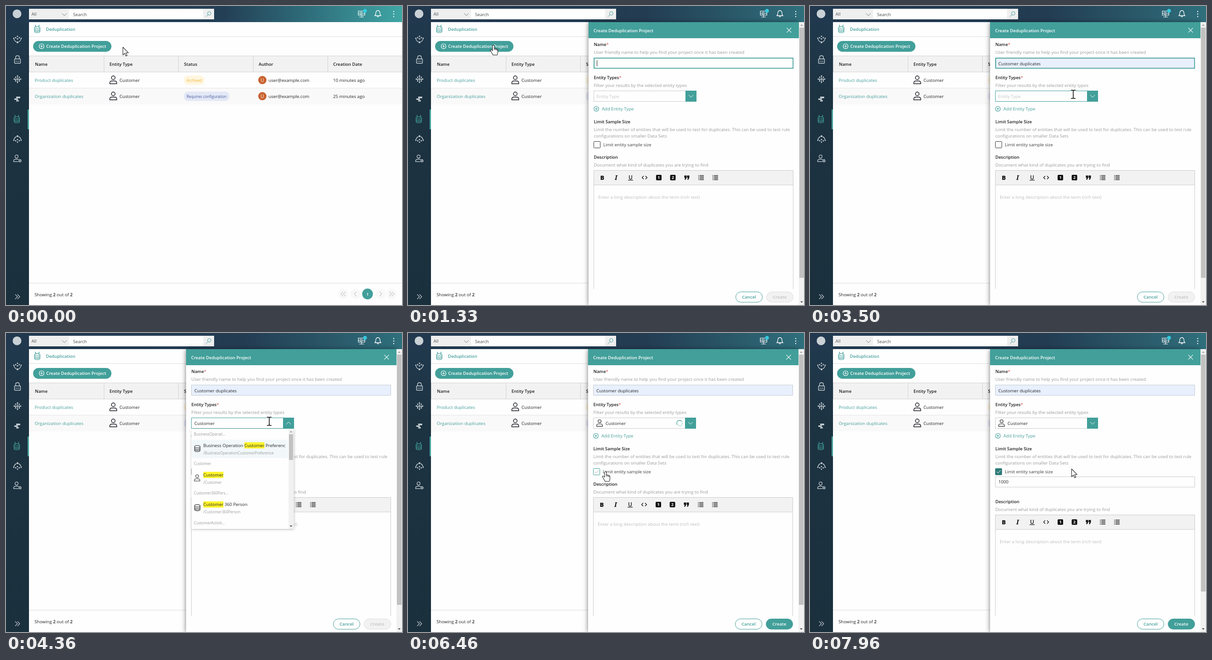
Animation, 862 px wide and 650 px high, one loop 8 s. Source, as an HTML page with a canvas:

```html
<!DOCTYPE html>
<html lang="en">
<head>
<meta charset="utf-8">
<title>Deduplication project</title>
<style>
html, body { margin: 0; width: 100%; height: 100%; overflow: hidden; background: #fefefe; }
canvas { display: block; }
</style>
</head>
<body>
<canvas id="stage" width="862" height="650"></canvas>
<script>
const c = document.getElementById('stage').getContext('2d');
const LOOP = 8000, TEAL = '#429f9a', INK = '#242424', GREY = '#9a9a9a', LINE = '#cbcbcb', ICON = '#c9d1d6';
const TYPED = 'Customer';

// time, x, y, pointer shape from this moment on
const POINTER = [
  [0, 254.5, 89.5, 'arrow'], [630, 254.5, 89.5, 'arrow'], [800, 228, 88, 'hand'], [1120, 186, 85, 'hand'],
  [1500, 186, 85, 'hand'], [1600, 240, 97, 'arrow'], [1950, 500, 168, 'arrow'], [2300, 447, 133.5, 'arrow'],
  [2450, 470, 140, 'arrow'], [2750, 530, 160, 'arrow'], [2900, 530, 160, 'arrow'], [3130, 573, 190, 'beam'],
  [3300, 573, 192, 'beam'], [5030, 573, 192, 'beam'], [5150, 540, 225, 'hand'], [5500, 425, 317, 'hand'],
  [5730, 425, 317, 'hand'], [6400, 430, 301, 'hand'], [6560, 430, 301, 'hand'], [6700, 408, 299, 'hand'],
  [7300, 404, 298, 'hand'], [7460, 404, 298, 'hand'], [7540, 430, 298, 'hand'], [7650, 490, 297, 'arrow'],
  [7940, 569.5, 295.5, 'arrow'], [LOOP, 569.5, 295.5, 'arrow']
];
const SHAPES = {
  arrow: 'M0 0V17L4 13.3L6.6 19.3L9.2 18.2L6.6 12.3H12Z',
  hand: 'M-2 1.5Q0-1 2 1.5V8Q4 6.8 5 8.5Q7 7.5 7.5 9.2Q9.5 8.6 9.5 11V16Q9.5 19 8 21.5H-1Q-3 18-5 14.5Q-8 11-6 10Q-4.5 9.5-2 12.5Z',
  beam: 'M-5-9H-1.5L0-8L1.5-9H5M0-8V8M-5 9H-1.5L0 8L1.5 9H5'
};

const clamp = v => Math.max(0, Math.min(1, v));
const mix = (a, b, k) => a + (b - a) * k;

function box(x, y, w, h, fill, stroke, r = 0, lw = 1) {
  c.beginPath();
  c.roundRect(x, y, w, h, r);
  if (fill) { c.fillStyle = fill; c.fill(); }
  if (stroke) { c.strokeStyle = stroke; c.lineWidth = lw; c.stroke(); }
}
function dot(x, y, r, fill, stroke, lw) { box(x - r, y - r, 2 * r, 2 * r, fill, stroke, r, lw); }

function path(d, x, y, stroke, fill, lw = 1) {
  c.save();
  c.translate(x, y);
  const p = new Path2D(d);
  if (fill) { c.fillStyle = fill; c.fill(p); }
  if (stroke) { c.strokeStyle = stroke; c.lineWidth = lw; c.stroke(p); }
  c.restore();
}

// Draws text on its baseline and returns the end position.
function text(s, x, y, color = INK, size = 9.65, weight = 400, family = '"Open Sans", "Noto Sans", sans-serif') {
  c.font = `${weight} ${size}px ${family}`;
  c.fillStyle = color;
  c.fillText(s, x, y);
  return x + c.measureText(s).width;
}
const bold = (s, x, y, color = '#1c1c1c') => text(s, x, y, color, 9.45, 600);

function shadowed(draw, blur, color) {
  c.save();
  c.shadowBlur = blur;
  c.shadowColor = color;
  c.shadowOffsetY = 1;
  draw();
  c.restore();
}

function gradient(x1, y1, stops) {
  const g = c.createLinearGradient(0, 0, x1, y1);
  stops.forEach(([k, color]) => g.addColorStop(k, color));
  return g;
}

const chevron = (x, y, color, up) => path(up ? 'M-5 2.5L0-2.5L5 2.5' : 'M-5-2.5L0 2.5L5-2.5', x, y, color);

function database(x, y, color, antennae) {
  path('M-6-4Q-6-6.5 0-6.5T6-4Q6-1.5 0-1.5T-6-4V4Q-6 7 0 7T6 4V-4M-6-1Q-6 1.7 0 1.7T6-1M-6 1.8Q-6 4.4 0 4.4T6 1.8', x, y, color, null, 1.1);
  if (antennae) {
    path('M-2.5-4L-4-9M2.5-4L4-9', x, y, color, null, 1.1);
    dot(x - 4, y - 9, 1, color);
    dot(x + 4, y - 9, 1, color);
  }
}

function person(x, y, s, color, lw) {
  c.save();
  c.translate(x, y);
  c.scale(s, s);
  path('M-4-5.5A4 4 0 1 0 4-5.5A4 4 0 1 0-4-5.5ZM-7.5 7.5V6Q-7.5 1.5-3 1.5H3Q7.5 1.5 7.5 6V7.5Z', 0, 0, color, null, lw / s);
  c.restore();
}

function plusCircle(x, y, r, color) {
  dot(x, y, r, null, color, 1.1);
  path('M-3 0H3M0-3V3', x, y, color, null, 1.1);
}

function hub(x, y, flip) {
  c.save();
  c.translate(x, y);
  c.scale(1, flip);
  path('M-8-3Q-7 3-2.5 5M8-3Q7 3 2.5 5', 0, 0, ICON, null, 1.4);
  [[0, -7], [-4, -4], [4, -4], [0, -1.5], [0, 6]].forEach(([a, b]) => dot(a, b, a || b < 0 ? 1.4 : 2, ICON));
  dot(-8, -3, 1.3, ICON);
  dot(8, -3, 1.3, ICON);
  c.restore();
}

function sidebar() {
  box(0, 35, 50, 615, gradient(0, 650, [[0, '#213a4f'], [.3, '#1c3342'], [1, '#1b303d']]));
  hub(25, 73, 1);
  box(18.5, 115, 13, 9.5, null, ICON, 1, 1.4);
  path('M-4 0V-3.5Q-4-7 0-7T4-3.5V0', 25, 115, ICON, null, 1.4);
  [22, 25, 28].forEach(x => dot(x, 120, .9, ICON));
  path('M0-8V8M-7 0H7M-4 0V4M4 0V4', 25, 159, ICON, null, 1.3);
  [[0, -7], [-7, 0], [7, 0], [-4, 4], [4, 4], [-4, -4], [4, -4], [0, 7]].forEach(([a, b]) => dot(25 + a, 159 + b, 1.4, ICON));
  box(22, 197, 9, 3.6, ICON, null, 1);
  box(18, 201, 8, 3, ICON, null, 1);
  box(22, 204.5, 6, 3, ICON, null, 1);
  database(23.5, 247, TEAL, true);
  box(47, 225, 3, 43, TEAL);
  hub(25, 289, -1);
  person(23, 332, .85, ICON, 1.3);
  dot(30.5, 336.5, 3.8, '#1b303d');
  c.setLineDash([1.3, 1.05]);
  dot(30.5, 336.5, 2.8, null, ICON, 1.4);
  c.setLineDash([]);
  dot(30.5, 336.5, 1.9, null, ICON, 1.2);
  path('M-5-5L0 0L-5 5M0-5L5 0L0 5', 25, 632, ICON, null, 1.1);
}

function topBar(dim) {
  box(0, 0, 862, 35, gradient(862, 0, [[0, '#21384e'], [.55, '#233f55'], [.78, '#30717e'], [1, '#3fa6a4']]));
  c.globalAlpha = dim;
  box(0, 0, 862, 35, gradient(862, 0, [[0, '#21384e'], [.6, '#233c52'], [1, '#2f6f7c']]));
  c.globalAlpha = 1;
  dot(24, 17, 9.5, ICON);
  box(50, 6, 87, 23, '#efefef');
  text('All', 55.5, 21, '#555');
  chevron(127, 18.5, '#777');
  box(137, 6, 292, 23, '#fefefe');
  text('Search', 146, 21.5, '#484848');
  box(429, 6, 24, 23, '#efefef');
  dot(442.5, 16, 3.8, null, TEAL);
  path('M0 0L-4.5 4.5', 439.8, 18.8, TEAL);
  path('M-7-6H7V-1H-7ZM-7-1V3H7V-1M0 3V7M-5 7H5M-4-3.5H2M-4 1H2', 774, 17, '#fff', null, 1.2);
  dot(781.5, 10.5, 4.2, '#36c9dd');
  path('M-6.5 4Q-4.5 2-4.5-2Q-4-7 0-7T4.5-2Q4.5 2 6.5 4ZM-2 5Q0 8.5 2 5', 809.5, 17, '#fff', null, 1.3);
  [12, 17.5, 23].forEach(y => dot(844, y, 1.2, '#fff'));
}

function page(linksHidden) {
  box(50, 35, 812, 615, '#fefefe');
  database(68, 51, TEAL, true);
  bold('Deduplication', 87, 54, TEAL);
  box(50, 66, 812, 1, '#dcdcdc');
  box(59, 76, 170.5, 23.5, TEAL, null, 11.75);
  plusCircle(77.5, 87.5, 5.3, '#fff');
  bold('Create Deduplication Project', 87.5, 91, '#fff');

  box(50, 108, 812, 36, '#f2f2f2');
  box(50, 108, 812, 1, '#d2d2d2');
  box(50, 143, 812, 1, '#d2d2d2');
  ['Name', 'Entity Type', 'Status', 'Author', 'Creation Date'].forEach((s, i) => {
    bold(s, 63 + i * 162.3, 130);
    box(Math.round(50 + i * 162.5), 108, 1, 36, '#d2d2d2');
  });
  box(50, 179, 812, 35, '#faf9f9');
  box(50, 178, 812, 1, '#e4e4e4');
  [['Product duplicates', 'Archived', '10 minutes ago', '#fff6df', '#eeb43c', 45],
   ['Organization duplicates', 'Requires configuration', '25 minutes ago', '#e4e9f7', '#4b5a9c', 99.5]
  ].forEach(([name, status, age, back, front, w], i) => {
    const y = 161.5 + i * 35;
    if (!linksHidden) text(name, 62.5, y + 3.5, TEAL);
    person(233.5, y, 1, '#1f1f28', 1.5);
    text('Customer', 247, y + 3.5);
    box(387, y - 10.5, w, 20.5, back, null, 9);
    text(status, 393, y + 3.2, front, 8.25);
    dot(558, y - .5, 9, '#c9622f');
    text('U', 554.3, y + 3.4, '#fff', 10);
    text('user@example.com', 571.5, y + 3.5);
    text(age, 712, y + 3.5);
  });

  box(50, 602, 812, 1, '#dcdcdc');
  let x = text('Showing ', 62, 630.5);
  x = bold('2', x, 630.5);
  x = text(' out of ', x, 630.5);
  bold('2', x, 630.5);
  [[734, 1, 1], [760.5, 1, 0], [815.5, -1, 0], [839.5, -1, 1]].forEach(([px, dir, twice]) => {
    dot(px, 626, 11, '#f8f8f8');
    for (let k = 0; k <= twice; k++) {
      const a = px + (twice ? k * 5.5 - 2.7 : 0);
      path(`M${2.5 * dir}-5L${-2.5 * dir} 0L${2.5 * dir} 5`, a, 626, '#aaa');
    }
  });
  dot(787, 626, 11.7, TEAL);
  text('1', 784.3, 629.5, '#fff', 9.65, 600);
}

function required(s, y) { text('*', bold(s, 403.5, y), y, '#d9534f'); }

function editor(y) {
  bold('Description', 403.5, y + 331.5);
  text('Document what kind of duplicates you are trying to find', 403.5, y + 348.5, GREY);
  box(403.5, y + 357.5, 434, 300, '#fefefe', LINE);
  box(403.5, y + 357.5, 434, 31.5, '#f2f2f2', LINE);
  const m = y + 373;
  text('B', 417.5, m + 5, '#111', 13, 800);
  text('I', 449, m + 5, '#111', 14, 'italic 700', '"Noto Serif", serif');
  text('U', 479, m + 3.5, '#111', 12, 600);
  box(478, m + 5, 11, 1.2, '#111');
  path('M-2-3.5L-5.5 0L-2 3.5M2-3.5L5.5 0L2 3.5', 514, m, '#111', null, 1.3);
  ['1', '2'].forEach((s, i) => {
    box(539 + i * 30.6, m - 6, 12, 12, '#111', null, 2);
    text(s, 542.4 + i * 30.6, m + 3.3, '#fff', 9, 700);
  });
  [600.5, 606.5].forEach(x => path('M0-4.5H5V0L3 4.5H.5L2 .5H0Z', x, m, null, '#111'));
  [637, 668].forEach(x => [-4.5, -1.5, 1.5, 4.5].forEach(d => {
    box(x - 6, m + d - .6, 1.7, 1.3, '#111');
    box(x - 3, m + d - .6, 9, 1.3, '#111');
  }));
  text('Enter a long description about the term (rich text)', 413, y + 419.3, '#bdbdbd');
}

function entityList(hoverRow) {
  shadowed(() => box(403.5, 208.5, 223, 217.5, '#fefefe'), 5, '#0005');
  box(404, 232 + hoverRow * 64.3, 210, 40, '#f2f8fa');
  ['BusinessOperati...', 'Customer', 'Customer360Pers...', 'CustomerActivit...']
    .forEach((s, i) => text(s, 409, 222.7 + i * 64.3, GREY, 8.2));
  [['Business Operation ', ' Preferenc', '/BusinessOperationCustomerPreference'],
   ['', '', '/Customer'], ['', ' 360 Person', '/Customer360Person']
  ].forEach(([before, after, sub], i) => {
    const y = 247.5 + i * 64.3;
    if (i === 1) person(416, y + 4, .8, '#333', 1.1);
    else database(416.5, y + 3.5, '#333');
    const x = text(before, 429.5, y, INK, 9.55);
    box(x, y - 10, c.measureText(TYPED).width, 13.5, '#fff52b');
    text(after, text(TYPED, x, y, INK, 9.55), y, INK, 9.55);
    text(sub, 429.5, y + 16, GREY, 8.15);
  });
  box(615, 209, 11, 217, '#f1f1f1');
  box(616, 220, 9, 56, '#c1c1c1');
  path('M-3 1.5H3L0-1.5Z', 620.5, 214.5, null, '#999');
  path('M-3-1.5H3L0 1.5Z', 620.5, 420, null, '#444');
}

function suggestions(hover) {
  shadowed(() => box(483, 144, 114, 161.5, '#fefefe'), 5, '#0006');
  if (hover) box(483, 145, 114, 26, '#f0f0f0');
  ['Customer duplicates', 'Fix country name', 'Fix industries', 'Replace value', 'Fix industry', 'Copy value']
    .forEach((s, i) => text(s, 491.5, 161.3 + i * 26.3, '#333', 8.9));
}

function spinner(t) {
  c.save();
  c.translate(591, 196);
  c.rotate(t / 1000 * 2 * Math.PI);
  c.strokeStyle = TEAL;
  c.lineWidth = 1.3;
  c.beginPath();
  c.arc(0, 0, 6, -.4, 2.6);
  c.stroke();
  c.setLineDash([1.5, 2]);
  c.beginPath();
  c.arc(0, 0, 6, 2.8, 5.8);
  c.stroke();
  c.restore();
}

function panel(t) {
  const picked = t >= 5730, checked = t >= 6640, listOpen = t >= 4300 && !picked;
  const shift = t >= 6700 ? 38 : 0;
  shadowed(() => box(392, 35, 458, 615, '#fefefe'), 10, '#0008');

  c.save();
  c.beginPath();
  c.rect(392, 35, 458, 580);
  c.clip();
  required('Name', 87);
  text('User friendly name to help you find your project once it has been created', 403.5, 103.8, GREY);
  const preview = t >= 2000 && t < 2800, filled = t >= 2000;
  box(403.5, 113, 434, 22.5, filled ? '#e8f0fe' : '#fefefe', '#c5cad2');
  if (t < 3640) box(404.2, 113.3, 433, 22, null, TEAL, 0, 1.7);
  if (filled) text('Customer duplicates', 410, 128.5, INK, preview ? 9.2 : 9.6);
  if (t < 2800) box(410, 118, 1, 13, '#222');

  required('Entity Types', 158.7);
  text('Filter your results by the selected entity types', 403.5, 175.5, GREY);
  box(403.5, 184.5, 200, 23, '#fefefe', t >= 3130 && !picked ? TEAL : LINE);
  box(603, 184, 24, 24, TEAL);
  chevron(615, 196, '#fff', listOpen);
  const letters = Math.floor(clamp((t - 3960) / 320) * TYPED.length);
  if (picked) {
    person(417, 196.5, .85, '#222', 1.1);
    text(TYPED, 430, 200);
    if (t < 7200) spinner(t);
  } else if (letters) {
    const x = text(TYPED.slice(0, letters), 410, 200);
    if (t >= 4730 && t < 5030) box(Math.round(x - 1), 189, 1, 14, '#222');
  } else {
    text('Entity Type', 409.5, 200, '#c4c4c4');
  }
  plusCircle(409, 223.5, 5.3, TEAL);
  text('Add Entity Type', 421, 227.3, TEAL);

  bold('Limit Sample Size', 403.5, 254.8);
  text('Limit the number of entities that will be used to test for duplicates. This can be used to test rule', 403.5, 271.7, GREY);
  text('configurations on smaller Data Sets', 403.5, 285.7, GREY);
  const hover = t >= 6300;
  box(403.5, 294.5, 14, 14, checked ? '#2f7b79' : '#fefefe', checked ? '#2f7b79' : hover ? TEAL : '#333', 1);
  if (hover) path('M-4 0L-1 3L4.5-3', 410.3, 301.5, checked ? '#fff' : '#aaa');
  text('Limit entity sample size', 424, 305.3, '#3c3c3c');
  if (shift) {
    box(403.5, 312.5, 434, 22.5, '#fefefe', LINE);
    text('1000', 410, 327.3);
  }
  editor(shift);
  if (t >= 1360 && t < 2800) suggestions(preview);
  if (listOpen) entityList(t >= 5300 ? 1 : 0);
  c.restore();

  box(392, 35, 458, 35, TEAL);
  bold('Create Deduplication Project', 403, 57, '#fff');
  path('M-5-5L5 5M5-5L-5 5', 828.5, 52.7, '#fff', null, 1.1);
  box(712.5, 621.5, 58, 22.5, '#fefefe', TEAL, 11.25);
  text('Cancel', 726, 636.3, TEAL, 9.6, 600);
  box(779.5, 621.5, 58, 22.5, picked ? TEAL : '#f2f2f2', picked ? TEAL : '#dedede', 11.25);
  text('Create', 793, 636.3, picked ? '#fff' : '#c3c3c3', 9.6, 600);

  box(850, 35, 12, 615, '#f1f1f1');
  box(851, 47, 10, (shift ? 562 : 591) - 47, '#c1c1c1');
  path('M-3 1.5H3L0-1.5Z', 856, 41.5, null, '#999');
  path('M-3-1.5H3L0 1.5Z', 856, 643.5, null, '#444');
}

function pointer(t) {
  const i = POINTER.findIndex(p => p[0] > t);
  const [t0, x0, y0, kind] = POINTER[i - 1], [t1, x1, y1] = POINTER[i];
  const k = (t - t0) / (t1 - t0), x = mix(x0, x1, k), y = mix(y0, y1, k);
  c.lineJoin = 'round';
  if (kind === 'beam') {
    path(SHAPES.beam, x, y, '#fff', null, 3);
    path(SHAPES.beam, x, y, '#111', null, 1.6);
  } else {
    path(SHAPES[kind], x, y, '#222', '#fff', 1.1);
    if (kind === 'hand') path('M2 7V11M5 8V11.5M7.5 9V12', x, y, '#222');
  }
  c.lineJoin = 'miter';
}

function draw(t) {
  const slide = 1 - (1 - clamp((t - 1200) / 150)) ** 3;
  page(t >= 1080 && t < 1240);
  topBar(slide);
  if (slide > 0) {
    c.save();
    c.translate(470 * (1 - slide), 0);
    panel(t);
    c.restore();
  }
  sidebar();
  pointer(t);
}

const start = performance.now();
function tick() {
  draw((performance.now() - start) % LOOP);
  requestAnimationFrame(tick);
}
tick();
</script>
</body>
</html>
```
